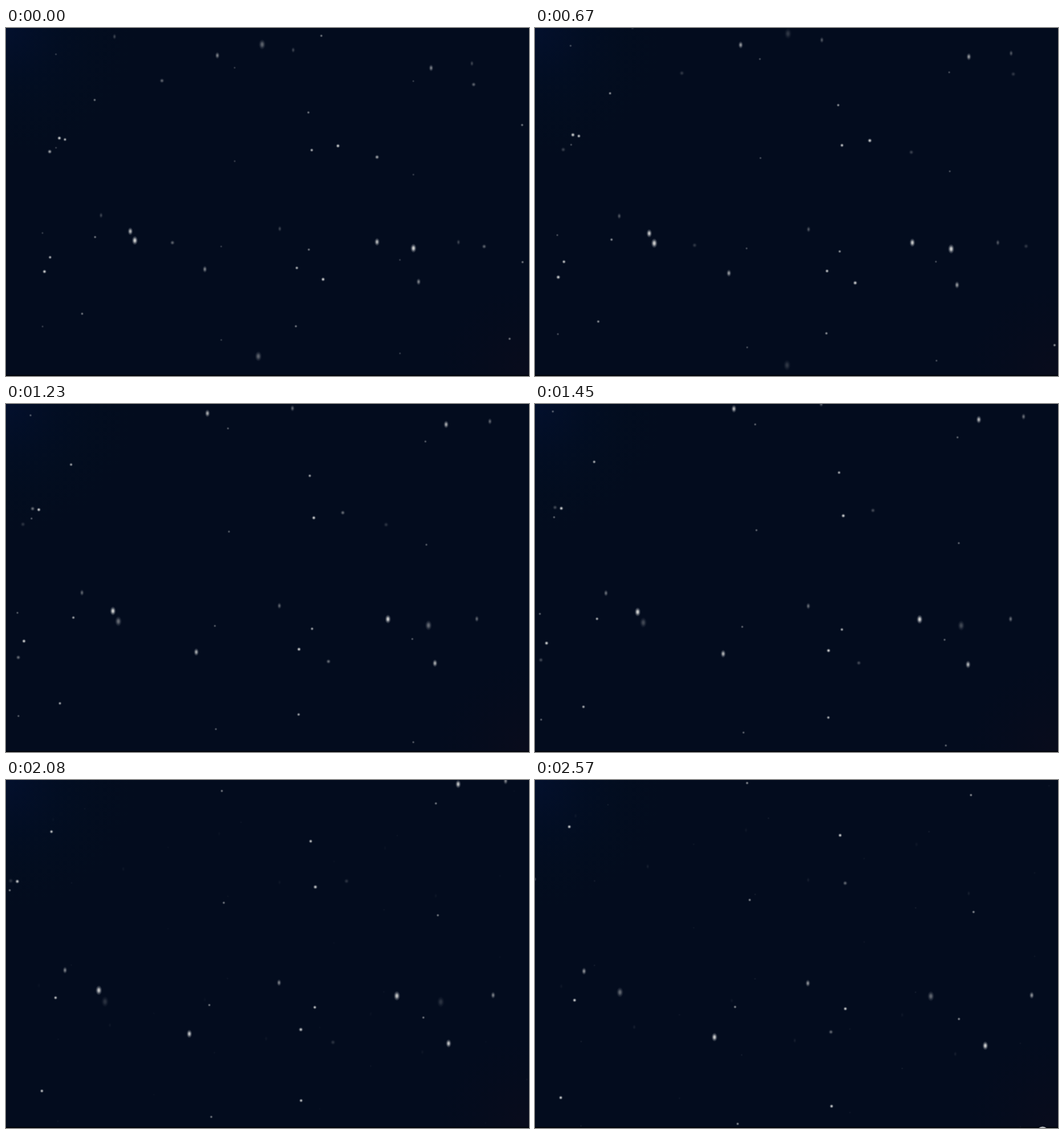
These frames come from a looping animation (917 px wide and 610 px high, 2.64 s). An HTML page with a canvas:

```html
<!DOCTYPE html>
<html lang="en">
<head>
<meta charset="utf-8">
<title>Star drift</title>
<style>
  html, body { margin: 0; width: 100%; height: 100%; overflow: hidden; background: #030c1e; }
  canvas { display: block; }
</style>
</head>
<body>
<canvas id="sky" width="917" height="610"></canvas>
<script>
const W = 917, H = 610, LOOP = 2640;
const CX = 488, CY = 335.5;
const ctx = document.getElementById('sky').getContext('2d');

// Each layer is a repeating tile that grows and turns about one centre.
// grow: size, speed, acceleration per step; dots are round, glow is the tall star.
const layers = [
  { grow: [249, .7, .0055], dots: [[-.4, -.446], [-.357, .076]], glow: [-.079, -.563] },
  { grow: [249, .7, .0055], zoom: 1.062, dim: .6, dots: [[.241, -.682], [.282, -.196]], glow: [-.461, -.79] },
  { grow: [314.2, 1.75, .0103], dots: [[-.3005, -.303], [-.34, -.823]], glow: [-.0215, .054] },
  { grow: [375.4, 2.45, .0066], dots: [[.083, -.505], [.1225, .134]], glow: [-.357, .254] },
  { grow: [433, 2.8, .0063], dots: [[.0988, -.285], [.059, .194]], glow: [.379, .075] },
  { grow: [488.7, 3.13, .0068], dots: [[.185, -.269], [.145, .211]], glow: [.466, .0905] },
  { grow: [530, 3.28, .0074], zoom: 1.083, dots: [[.28, -.195]] },
  { grow: [546.6, 3.4, .006], dots: [[-.398, -.44], [-.358, .079]], glow: [-.078, -.56] }
];

// Tile size against opacity.
const fade = [[266, 0], [283, .08], [314, .25], [375, .52], [433, .78], [480, .92],
  [520, .92], [537, .53], [548, .38], [560, .25], [590, .17], [598, 0]];

function opacity(size) {
  const k = fade.findIndex(p => p[0] > size);
  if (k < 1) return 0;
  const [x0, y0] = fade[k - 1], [x1, y1] = fade[k];
  return y0 + (y1 - y0) * (size - x0) / (x1 - x0);
}

function stepAt(t) {
  if (t < 180) return Math.min(2, Math.floor(t / 70));
  if (t < 1170) return Math.min(16, 3 + Math.floor((t - 180) / 70));
  return 17 + Math.floor((t - 1170) / 70);
}

function radial(x, y, r, stops) {
  const g = ctx.createRadialGradient(x, y, 0, x, y, r);
  stops.forEach(([at, color]) => g.addColorStop(at, color));
  return g;
}

function backdrop() {
  ctx.fillStyle = '#030c1e';
  ctx.fillRect(0, 0, W, H);
  ctx.fillStyle = radial(0, 0, 230, [[0, '#03102d'], [.4, 'rgba(2,14,36,.8)'], [1, 'rgba(2,14,30,0)']]);
  ctx.fillRect(0, 0, 230, 230);
  ctx.fillStyle = radial(W, H, 160, [[0, 'rgba(10,12,28,.9)'], [1, 'rgba(6,12,28,0)']]);
  ctx.fillRect(W - 160, H - 160, 160, 160);
  ctx.fillStyle = '#01040b';
  ctx.fillRect(0, H - 2, W, 2);
}

const starFill = radial(0, 0, 1, [[0, '#f2f2ee'], [.3, 'rgba(240,240,236,.78)'],
  [.65, 'rgba(235,238,240,.28)'], [1, 'rgba(235,238,240,0)']]);

function star(x, y, rx, ry) {
  if (x < -rx || x > W + rx || y < -ry || y > H + ry) return;
  ctx.save();
  ctx.translate(x, y);
  ctx.scale(rx, ry);
  ctx.fillStyle = starFill;
  ctx.fillRect(-1, -1, 2, 2);
  ctx.restore();
}

function drawLayer({ grow, zoom = 1, dim = 1, dots, glow }, i) {
  const size = grow[0] + grow[1] * i + grow[2] * i * i;
  const alpha = opacity(size) * dim;
  if (!alpha) return;
  const turn = (4.3 - .01549 * (size - 314.2)) * Math.PI / 180;
  const c = Math.cos(turn) * size * zoom, s = Math.sin(turn) * size * zoom;
  const tile = ([u, v], rx, ry) => {
    for (let m = -2; m <= 3; m++) for (let n = -2; n <= 3; n++) {
      const a = u + m, b = v + n;
      star(CX + a * c - b * s, CY + a * s + b * c, rx * size, ry * size);
    }
  };
  ctx.globalAlpha = alpha;
  dots.forEach(p => tile(p, .0079, .0079));
  if (glow) tile(glow, .0112, .0167);
  ctx.globalAlpha = 1;
}

function draw(i) {
  backdrop();
  layers.forEach(layer => drawLayer(layer, i));
  if (i >= 37) {
    ctx.fillStyle = '#b9bcbd';
    ctx.beginPath();
    ctx.ellipse(890, 617, 10, 9.5, 0, 0, 7);
    ctx.fill();
  }
}

const start = performance.now();
function tick() {
  draw(stepAt((performance.now() - start) % LOOP));
  requestAnimationFrame(tick);
}
tick();
</script>
</body>
</html>
```
